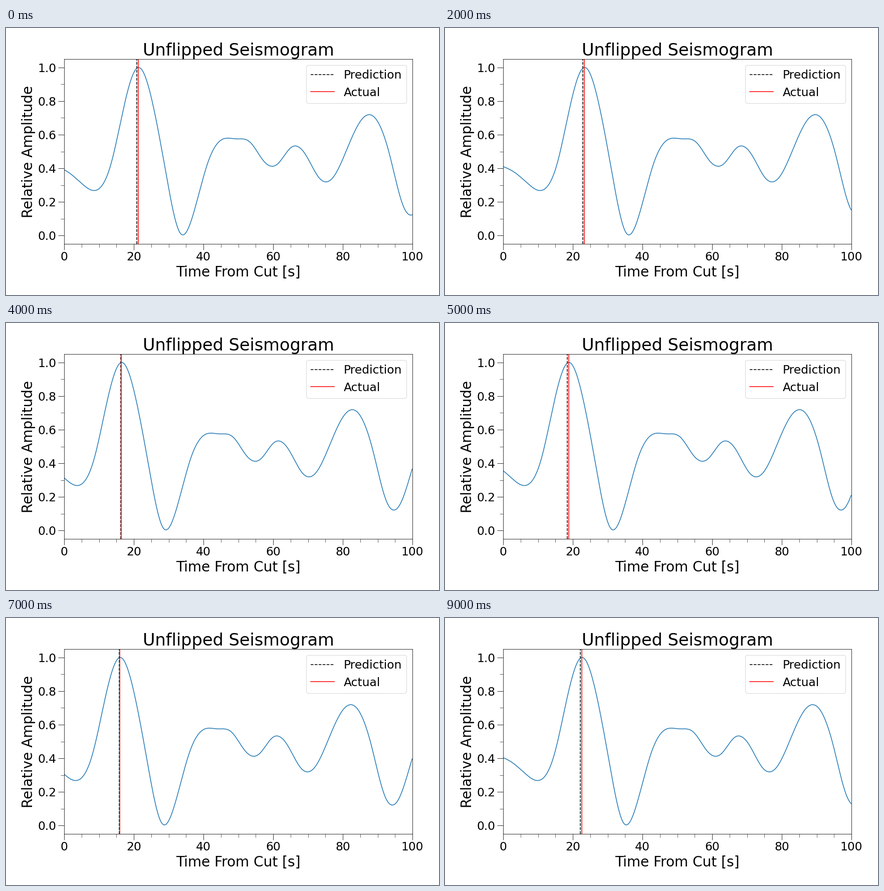
These frames come from a looping animation (864 px wide and 533 px high, 10 s). A matplotlib script:

```python
import numpy as np
import matplotlib.pyplot as plt
from matplotlib.animation import FuncAnimation
from matplotlib.ticker import MultipleLocator

W, H, DPI = 864, 533, 72
LEFT, RIGHT, TOP, BOTTOM = 116, 811, 62, 431

# Amplitude every STEP seconds, starting START seconds from the main peak
START, STEP = -24, 4
LEVELS = [.416, .375, .305, .270, .415, .779, 1, .796, .364, .015, .143, .436,
          .571, .575, .557, .443, .426, .526, .482, .341, .348, .519, .687,
          .699, .492, .179, .156, .404, .660]

# Arrival time of the main peak in each cut
PEAKS = [21.3, 19.6, 23.33, 22.47, 16.45, 18.8, 20.14, 16.01, 20.6, 22.58]


def spline(y):
    """Natural cubic spline through evenly spaced values."""
    y = np.asarray(y)
    n = len(y)
    a = 4 * np.eye(n) + np.eye(n, k=1) + np.eye(n, k=-1)
    a[[0, -1]] = np.eye(n)[[0, -1]]
    bend = np.linalg.solve(a, np.pad(np.diff(y, 2), 1))

    def value(x):
        i = np.clip(np.floor(x).astype(int), 0, n - 2)
        q = x - i
        p = 1 - q
        return (p * y[i] + q * y[i + 1]
                + (p**3 - p) * bend[i] + (q**3 - q) * bend[i + 1])
    return value


wave = spline(LEVELS)
time = np.linspace(0, 99.9, 1000)

plt.rcParams.update({"font.family": "DejaVu Sans", "font.size": 28})
fig = plt.figure(figsize=(W / DPI, H / DPI), dpi=DPI, facecolor="white")
ax = fig.add_axes([LEFT / W, 1 - BOTTOM / H,
                   (RIGHT - LEFT) / W, (BOTTOM - TOP) / H])
ax.set_xlim(0, 100)
ax.set_ylim(-.05, 1.05)
for axis, major, minor in ((ax.xaxis, 20, 5), (ax.yaxis, .2, .1)):
    axis.set_major_locator(MultipleLocator(major))
    axis.set_minor_locator(MultipleLocator(minor))
ax.tick_params(which="major", length=12, labelsize="small")
ax.tick_params(which="minor", length=7)
ax.set_title("Unflipped Seismogram", fontsize="large")
ax.set_xlabel("Time From Cut [s]")
ax.set_ylabel("Relative Amplitude")

curve, = ax.plot([], [], color="tab:blue", lw=1.5)
predicted = ax.axvline(0, color="black", ls="--", lw=1.5, label="Prediction")
actual = ax.axvline(0, color="red", lw=1.5, label="Actual")
ax.legend(loc="upper right", fontsize="small")


def draw(i):
    peak = PEAKS[i]
    guess = .97 * peak + .24  # later arrivals are missed by a little more
    curve.set_data(time, wave((time - peak - START) / STEP))
    predicted.set_xdata([guess, guess])
    actual.set_xdata([peak, peak])
    return curve, predicted, actual


anim = FuncAnimation(fig, draw, frames=len(PEAKS), interval=1000, repeat=True)
plt.show()
```
